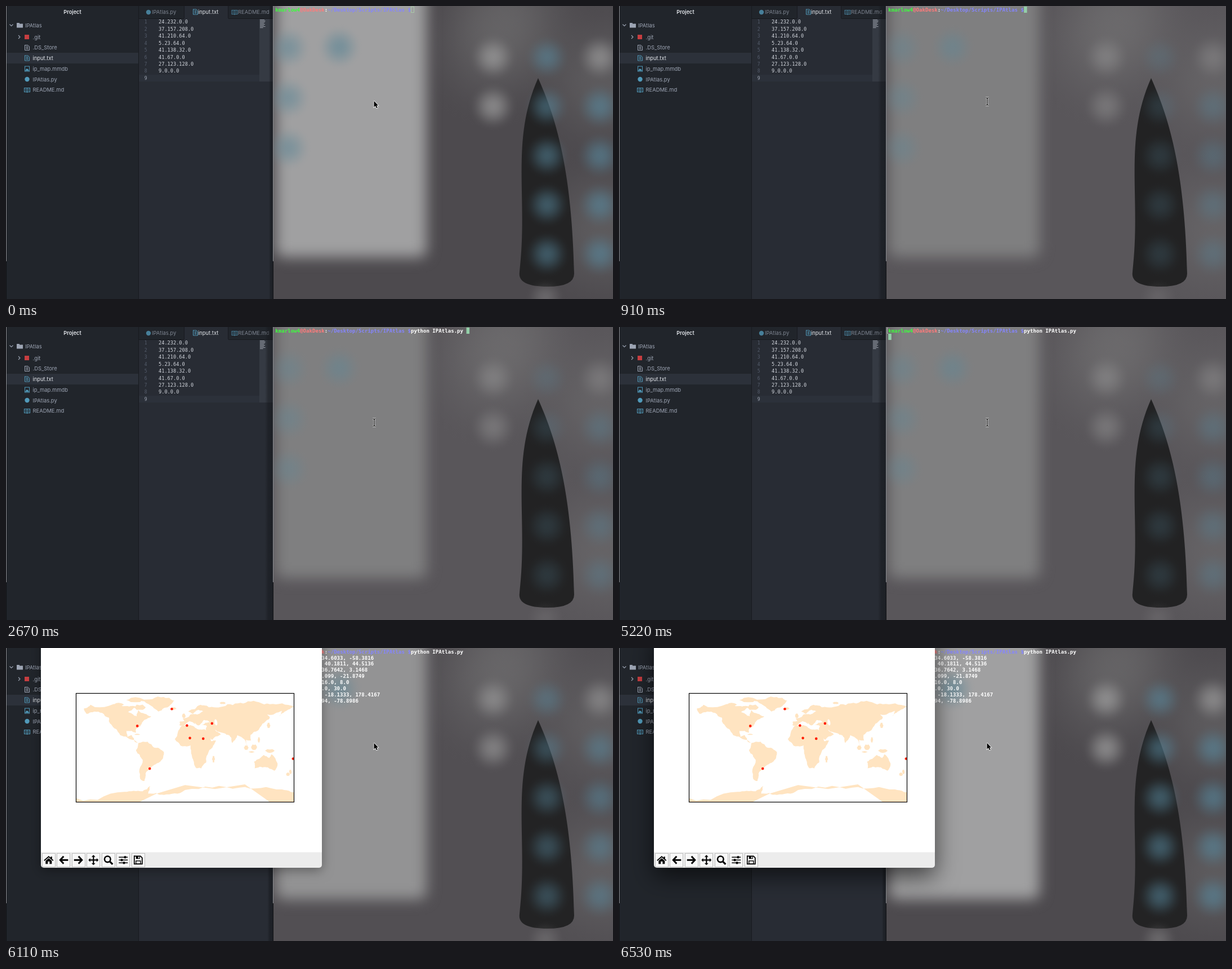
An HTML page with a canvas that plays this animation: 1078x520 px, repeating every 8 s.

```html
<!DOCTYPE html>
<html lang="en">
<head>
<meta charset="utf-8">
<title>IPAtlas</title>
<style>
html, body { margin: 0; width: 100%; height: 100%; overflow: hidden; background: #21252b; }
canvas { display: block; }
</style>
</head>
<body>
<canvas id="stage" width="1078" height="520"></canvas>
<script>
const W = 1078, H = 520, LOOP = 8000, TERM_X = 475;
const UI = 'Inter, Roboto, sans-serif';
const MONO = '"DejaVu Sans Mono", "Liberation Mono", monospace';
const g = document.getElementById('stage').getContext('2d');

const hosts = [
  ['24.232.0.0', '-34.6033', '-58.3816'],
  ['37.157.208.0', '40.1811', '44.5136'],
  ['41.210.64.0', '36.7642', '3.1468'],
  ['5.23.64.0', '64.099', '-21.8749'],
  ['41.138.32.0', '16.0', '8.0'],
  ['41.67.0.0', '15.0', '30.0'],
  ['27.123.128.0', '-18.1333', '178.4167'],
  ['9.0.0.0', '35.994', '-78.8986']
];
const command = 'python IPAtlas.py ';
const prompt = [
  ['kmarlow4', '#3dff3d'], ['@OakDesk', '#ff7b7b'], [':', '#fff'],
  ['~/Desktop/Scripts/IPAtlas $', '#8585ff']
];

function box(x, y, w, h, color) {
  g.fillStyle = color;
  g.fillRect(x, y, w, h);
}

function label(s, x, y, font, color, align = 'left') {
  g.font = font;
  g.fillStyle = color;
  g.textAlign = align;
  g.textBaseline = 'alphabetic';
  g.fillText(s, x, y);
}

function line(color, width, ...pts) {
  g.strokeStyle = color;
  g.lineWidth = width;
  g.beginPath();
  for (let i = 0; i < pts.length; i += 2) g.lineTo(pts[i], pts[i + 1]);
  g.stroke();
}

function frame(x, y, w, h, color, width = 1) {
  g.strokeStyle = color;
  g.lineWidth = width;
  g.strokeRect(x, y, w, h);
}

function disc(x, y, r, color) {
  g.fillStyle = color;
  g.beginPath();
  g.arc(x, y, r, 0, 7);
  g.fill();
}

function poly(pts, color) {
  g.fillStyle = color;
  g.beginPath();
  for (let i = 0; i < pts.length; i += 2) g.lineTo(pts[i], pts[i + 1]);
  g.closePath();
  g.fill();
}

// ---- editor ----
function docIcon(x, y, color) {
  line(color, 1, x - 4, y - 4.5, x + 1.5, y - 4.5, x + 4, y - 2, x + 4, y + 4.5, x - 4, y + 4.5, x - 4, y - 5);
  for (let i = -2; i <= 2; i += 2) line(color, 1, x - 2, y + i, x + 2, y + i);
}

function bookIcon(x, y, color) {
  frame(x - 5, y - 3.5, 10, 7, color);
  line(color, 1, x, y - 3, x, y + 5);
  for (let i = -1.5; i <= 1.5; i += 1.5) {
    line(color, .7, x - 3.5, y + i, x - 1.3, y + i);
    line(color, .7, x + 1.3, y + i, x + 3.5, y + i);
  }
}

function tree() {
  const blue = '#519aba', grey = '#9da5b4', font = `9.4px ${UI}`;
  box(0, 0, 235, H, '#21252b');
  box(0, 83, 235, 19, '#2c313a');
  label('Project', 118, 14, `600 9.2px ${UI}`, '#e3e6eb', 'center');
  line(grey, 1.1, 6.5, 32.5, 9.5, 35.5, 12.5, 32.5);
  line(grey, 1.1, 22, 52, 25, 55, 22, 58);
  box(19, 30, 5, 2, grey);
  box(19, 31.5, 11, 7, grey);
  label('IPAtlas', 34, 37.5, font, grey);
  const names = ['.git', '.DS_Store', 'input.txt', 'ip_map.mmdb', 'IPAtlas.py', 'README.md'];
  names.forEach((name, i) => label(name, 47.5, 58.6 + i * 18.75, font, i === 2 ? '#e3e6eb' : grey));
  box(33, 51, 8, 8, '#c63d40');
  docIcon(37.5, 74, grey);
  docIcon(37.5, 92.5, blue);
  frame(33.5, 107, 8, 9, blue);
  poly([34, 115, 36.5, 111, 39, 112, 41, 115], blue);
  disc(37.5, 130, 4.2, blue);
  bookIcon(37.5, 149, blue);
}

function editor() {
  const blue = '#477f99', font = `9.4px ${UI}`;
  box(235, 0, 240, H, '#282c34');
  box(236, 0, 239, 22, '#21252b');
  box(316, 0, 78, 23, '#282c34');
  box(235, 0, 1, H, '#181a1f');
  box(316, 0, 1, 22, '#181a1f');
  box(394, 0, 1, 22, '#181a1f');
  box(236, 22, 80, 1, '#181a1f');
  box(395, 22, 80, 1, '#181a1f');
  disc(253, 11, 4.2, blue);
  label('IPAtlas.py', 259, 14.2, font, '#7d8490');
  docIcon(336.5, 10.5, '#519aba');
  label('input.txt', 341, 14.2, font, '#e3e6eb');
  bookIcon(406, 11, blue);
  label('README.md', 412, 14.2, font, '#7d8490');

  box(236, 122, 214, 12, '#2c313a');
  box(450, 23, 24, 111, '#353a43');
  for (let i = 0; i < 9; i++) {
    const y = 31.3 + i * 12.45, host = hosts[i];
    label(String(i + 1), 250.5, y, `8px ${MONO}`, host ? '#555d6c' : '#a0a7b4', 'right');
    if (!host) continue;
    label(host[0], 271, y, `8.65px ${MONO}`, '#d3d7de');
    box(451, 24 + i * 2, host[0].length * .8, 1, '#969ba5');
  }
}

function edges(k) {
  const w = 14 - 7 * k, shade = g.createLinearGradient(474 - w, 0, 474, 0);
  shade.addColorStop(0, 'rgba(20,22,26,0)');
  shade.addColorStop(.4, 'rgba(20,22,26,.45)');
  shade.addColorStop(1, 'rgba(20,22,26,.55)');
  box(474 - w, 0, w, H, shade);
  for (const x of [0, 474]) {
    box(x, 0, 1, 453, '#898b8f');
    box(x, 453, 1, H - 453, '#111215');
  }
}

// ---- terminal ----
const mix = (a, b, k) => a + (b - a) * k;
const grey = (a, b, k, tint = 0) => {
  const v = Math.round(mix(a, b, k));
  return `rgb(${v},${v - tint},${v + 1})`;
};

function glow(c, x, y, r, rgb, alpha) {
  const fade = c.createRadialGradient(x, y, 0, x, y, r);
  for (let p = 0; p <= 1; p += .125)
    fade.addColorStop(p, `rgba(${rgb},${alpha * (1 + Math.cos(p * Math.PI)) / 2})`);
  c.fillStyle = fade;
  c.fillRect(x - r, y - r, 2 * r, 2 * r);
}

// k: 0 while the terminal has focus, 1 when it has lost it
function paintBackdrop(k) {
  const layer = document.createElement('canvas'), c = layer.getContext('2d');
  layer.width = W - TERM_X;
  layer.height = H;
  c.translate(-TERM_X, 0);
  c.fillStyle = grey(89, 77, k, 3);
  c.fillRect(TERM_X, 0, W, H);
  for (const [x, y] of [[865, 70], [900, 10], [1060, 130], [1060, 400]])
    glow(c, x, y, 150, '128,128,128', .3);

  c.filter = 'blur(12px)';
  c.fillStyle = grey(127, 160, k);
  c.beginPath();
  c.roundRect(479, -80, 268, 526, 14);
  c.fill();
  c.filter = 'none';

  // plain dark figure
  c.fillStyle = grey(34, 35, k);
  c.beginPath();
  c.moveTo(945, 128);
  c.bezierCurveTo(980, 205, 1005, 300, 1009, 475);
  c.quadraticCurveTo(1009, 498, 962, 498);
  c.quadraticCurveTo(908, 498, 912, 472);
  c.bezierCurveTo(928, 340, 895, 240, 945, 128);
  c.fill();

  const blue = '88,138,160', dull = '96,135,150', white = '165,165,165';
  for (let i = 0; i < 5; i++) {
    const y = 91 + i * 87.3;
    glow(c, 961, y, 42, blue, mix(.2, .5, k));
    glow(c, 1055, y, 44, i ? blue : white, mix(.3, .55, k));
    if (i < 2) glow(c, 865, y, 44, white, mix(.35, .6, k));
    if (i < 3) glow(c, 502, 74 + i * 89, 42, dull, mix(.35, .52, k));
  }
  glow(c, 592, 73, 42, dull, mix(.45, .62, k));
  glow(c, 958, 518, 36, white, mix(.15, .3, k));
  return layer;
}

const backdrops = new Map();
function backdrop(k) {
  if (!backdrops.has(k)) backdrops.set(k, paintBackdrop(k));
  g.drawImage(backdrops.get(k), TERM_X, 0);
}

function terminal(t, k) {
  const font = `bold 9.09px ${MONO}`, cell = 5.473, left = 478.3, step = 10.93;
  backdrop(k);
  let col = 0, row = 0;
  for (const [s, color] of prompt) {
    label(s, left + col * cell, 9.6, font, color);
    col += s.length;
  }
  const typed = t < 2200 ? '' : t < 2670 ? command.slice(0, 5) : command;
  label(typed, left + col * cell, 9.6, font, '#fff');
  col += typed.length;
  if (t >= 5220) {
    line('#b5b5b5', 1, 478, 1.5, 476.5, 1.5, 476.5, 11.5, 478, 11.5);
    row = 1;
    col = 0;
  }
  if (t >= 5970) {
    hosts.forEach(([ip, lat, lon], i) => label(`${ip} -- ${lat}, ${lon}`, left, 20.5 + i * step, font, '#fff'));
    row = 9;
  }
  const x = left + col * cell, y = 1 + row * step;
  if (k < .5) box(x, y, cell, 11, '#93cfa8');
  else frame(Math.round(x) + .5, y + .5, 5, 10, '#a9c9a9');
}

// ---- plot window ----
const PLOT = [124.5, 80.5, 387, 193];
const mapX = lon => PLOT[0] + (lon + 180) / 360 * PLOT[2];
const mapY = lat => PLOT[1] + (90 - lat) / 180 * PLOT[3];

// Coarse outlines as lon, lat pairs; the coast detail is added by roughen()
const coasts = {
  eurasia: [-9,37, -9,43, -1,44, -4,48, 8,54, 20,55, 30,60, 22,63, 18,61, 13,56, 5,60, 26,71, 40,67, 70,72,
    104,77, 140,72, 180,68, 163,58, 156,52, 160,61, 136,55, 140,50, 128,40, 122,30, 108,21, 109,12, 100,13,
    104,2, 94,17, 87,21, 78,8, 72,21, 57,26, 49,30, 59,22, 45,13, 35,28, 36,36, 27,38, 41,42, 31,46, 23,37,
    13,45, 17,39, 8,44, -1,37],
  northAmerica: [-167,65, -156,71, -95,69, -82,68, -94,59, -80,52, -77,62, -56,52, -70,43, -81,31, -81,25,
    -97,28, -95,18, -88,21, -83,10, -78,8, -105,20, -113,30, -124,40, -126,50, -150,60, -162,56],
  southAmerica: [-77,8, -62,10, -50,0, -35,-7, -40,-22, -48,-27, -65,-42, -67,-55, -74,-52, -70,-20, -81,-5],
  africa: [-6,36, 10,37, 20,31, 33,30, 43,11, 51,12, 40,-4, 35,-24, 27,-34, 19,-34, 12,-17, 9,4, -8,4, -17,14],
  greenland: [-73,78, -35,84, -18,78, -25,70, -44,60, -54,68],
  australia: [114,-23, 130,-12, 139,-17, 143,-11, 153,-27, 148,-38, 132,-32, 115,-34],
  antarctica: [-190,-78, -100,-73, -70,-72, -58,-63, -61,-76, -35,-78, 0,-70, 90,-66, 160,-69, 190,-79,
    190,-99, -190,-99]
};
// Centre and half sizes in degrees
const islands = [
  [-110,71,9,3], [-75,67,10,5], [-82,79,15,4], [-2,53,3,4], [-19,65,5,2], [47,-19,2.5,6], [138,37,3,5],
  [114,1,5,5], [101,0,4,4], [110,-7,5,1], [140,-5,8,3], [122,13,2,5], [174,-40,2,4], [170,-44,3,3],
  [-79,22,5,1], [62,74,5,2]
];

function roughen(pts, passes, rand) {
  for (; passes; passes--) {
    const next = [];
    for (let i = 0; i < pts.length; i += 2) {
      const j = (i + 2) % pts.length, dx = pts[j] - pts[i], dy = pts[j + 1] - pts[i + 1];
      const bend = Math.abs(dx) + Math.abs(dy) > 2 ? (rand() - .5) * .26 : 0;
      next.push(pts[i], pts[i + 1], pts[i] + dx / 2 - dy * bend, pts[i + 1] + dy / 2 + dx * bend);
    }
    pts = next;
  }
  return pts.map((v, i) => i % 2 ? mapY(v) : mapX(v));
}

let seed = 11;
const rand = () => (seed = seed * 16807 % 2147483647) / 2147483647;
const lands = Object.values(coasts).map(pts => roughen(pts, 3, rand));
for (const [lon, lat, w, h] of islands) {
  const ring = [0, 1, 2, 3, 4, 5].flatMap(i => [lon + w * Math.cos(i * 1.047), lat + h * Math.sin(i * 1.047)]);
  lands.push(roughen(ring, 1, rand));
}

const tools = [
  (x, y) => {
    line('#000', 1.8, x - 8, y + 1, x, y - 6, x + 8, y + 1);
    box(x + 3.5, y - 6, 2.5, 4, '#000');
    poly([x - 5.5, y + 1.5, x, y - 3.2, x + 5.5, y + 1.5, x + 5.5, y + 7, x - 5.5, y + 7], '#000');
    box(x - 1.6, y + 2.5, 3.2, 5, '#f8f8f8');
  },
  (x, y) => bigArrow(x, y, -1),
  (x, y) => bigArrow(x, y, 1),
  (x, y) => {
    for (let i = 0; i < 4; i++) {
      g.save();
      g.translate(x, y);
      g.rotate(i * Math.PI / 2);
      line('#000', 2.2, 0, 0, 6, 0);
      poly([9, 0, 5.6, -3.4, 5.6, 3.4], '#000');
      g.restore();
    }
  },
  (x, y) => {
    disc(x - 1.5, y - 1.5, 6.6, '#000');
    disc(x - 1.5, y - 1.5, 4, '#f8f8f8');
    line('#000', 3.2, x + 2.5, y + 2.5, x + 7.5, y + 7.5);
  },
  (x, y) => [3, -3, 1].forEach((dx, i) => {
    const dy = i * 5 - 5;
    line('#000', 1.5, x - 8, y + dy, x + 8, y + dy);
    box(x + dx - 1.5, y + dy - 2, 3.5, 4, '#000');
  }),
  (x, y) => {
    line('#000', 1.8, x - 7, y - 7, x + 4, y - 7, x + 7, y - 4, x + 7, y + 7, x - 7, y + 7, x - 7, y - 8);
    box(x - 4, y - 7, 7, 5, '#000');
    box(x, y - 6, 1.8, 3, '#fff');
    frame(x - 4, y + 1.5, 8, 5.5, '#000', 1.4);
  }
];

function bigArrow(x, y, dir) {
  line('#000', 3, x, y - 6.5, x + 6 * dir, y, x, y + 6.5);
  line('#000', 3, x + 5 * dir, y, x - 8 * dir, y);
}

function plotWindow(k) {
  g.save();
  g.shadowColor = `rgba(0,0,0,${mix(.35, .6, k)})`;
  g.shadowBlur = mix(20, 42, k);
  g.shadowOffsetY = mix(5, 15, k);
  g.fillStyle = '#ececec';
  g.beginPath();
  g.roundRect(62, -30, 499, 420, 5);
  g.fill();
  g.restore();
  box(62, 0, 499, 362.5, '#fff');

  g.save();
  g.beginPath();
  g.rect(...PLOT);
  g.clip();
  for (const land of lands) poly(land, '#ffe4c1');
  g.fillStyle = '#fff';
  g.beginPath();
  g.ellipse(mapX(51), mapY(42), 2.4, 5.5, -.2, 0, 7);
  g.fill();
  for (const [, lat, lon] of hosts) disc(mapX(+lon), mapY(+lat), 2.3, '#ff1e00');
  g.restore();
  frame(...PLOT, '#000', 1.2);

  tools.forEach((icon, i) => {
    const x = 75.8 + i * 26.5, y = 376.3;
    box(x - 12, y - 12, 24, 24, '#f8f8f8');
    frame(Math.round(x - 12) + .5, 364.5, 23, 24, '#bdbdbd');
    icon(x, y);
  });
}

function pointer(t) {
  if (t >= 710 && t < 5970) {
    for (const [color, w] of [['#d8d8d8', 2.8], ['#151515', 1.2]]) {
      line(color, w, 654, 164, 654, 175);
      for (const [y, tip] of [[163, 164], [176, 175]])
        line(color, w, 651, y, 653, y, 654, tip, 655, y, 657, y);
    }
    return;
  }
  const pts = [653.5, 168.5, 653.5, 179.5, 656, 177.3, 658, 181.3, 659.8, 180.5, 658, 176.7, 661, 176.5];
  line('#fff', 1.6, ...pts, pts[0], pts[1]);
  poly(pts, '#000');
}

function draw(t) {
  const k = t < 150 ? 1 : t < 910 ? .05 : t < 6110 ? 0 : t < 6320 ? .6 : 1;
  tree();
  editor();
  terminal(t, k);
  edges(k);
  if (t >= 6110) plotWindow(t < 6320 ? 0 : 1);
  pointer(t);
}

function tick() {
  draw(performance.now() % LOOP);
  requestAnimationFrame(tick);
}
tick();
</script>
</body>
</html>
```
